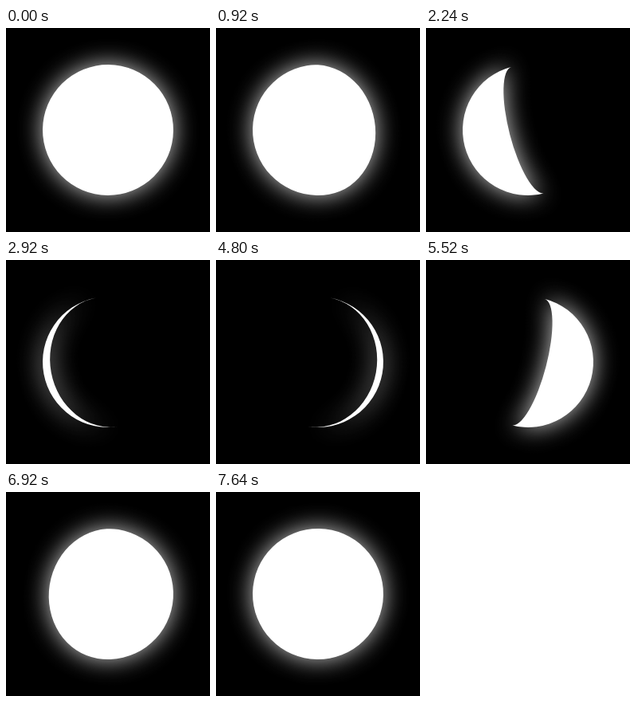
Recreate the animation shown at these times as an HTML page. Size 256x256 px, loop 7.68 s.

```html
<!DOCTYPE html>
<html lang="en">
<head>
<meta charset="utf-8">
<title>Moon phases</title>
<style>
  html, body { margin: 0; width: 100%; height: 100%; overflow: hidden; background: #000; }
  svg { display: block; width: 100vw; height: 100vh; }
</style>
</head>
<body>
<svg viewBox="0 0 256 256">
  <defs>
    <filter id="blur" filterUnits="userSpaceOnUse" x="-128" y="-128" width="256" height="256"
            color-interpolation-filters="sRGB">
      <feGaussianBlur stdDeviation="15"/>
    </filter>
    <path id="lit"/>
  </defs>
  <g id="moon" fill="#fff">
    <use href="#lit" filter="url(#blur)" opacity=".8"/>
    <use href="#lit"/>
  </g>
</svg>
<script>
const LOOP = 7680;
const FULL = 40; // time of the full moon
const R = 82;
const TILT = 15;
// [ms from full moon, phase angle in degrees]
const PHASES = [[0, 0], [880, 28.7], [1560, 63.2], [2920, 154.5], [3560, 180]];

const moon = document.getElementById('moon');
const lit = document.getElementById('lit');

// Slope through the neighbours; flat at both ends
function slope(i) {
  const a = PHASES[i - 1], b = PHASES[i + 1];
  return a && b ? (b[1] - a[1]) / (b[0] - a[0]) : 0;
}

// Cubic Hermite interpolation of the phase table
function phaseAt(t) {
  const i = PHASES.findIndex(p => p[0] > t) - 1;
  if (i < 0) return 180;
  const [t0, p0] = PHASES[i], [t1, p1] = PHASES[i + 1];
  const span = t1 - t0, u = (t - t0) / span, v = 1 - u;
  return p0 * v * v * (1 + 2 * u) + p1 * u * u * (3 - 2 * u)
    + span * u * v * (slope(i) * v - slope(i + 1) * u);
}

function draw(now) {
  const t = (now - FULL + LOOP) % LOOP;
  const waxing = t > LOOP / 2;
  const k = Math.cos(phaseAt(waxing ? LOOP - t : t) * Math.PI / 180);
  const tilt = -TILT * Math.sin(2 * Math.PI * t / LOOP);

  // Outer limb on the left, terminator as a half ellipse back to the top
  lit.setAttribute('d', k < -0.9999 ? '' :
    `M0 ${-R}A${R} ${R} 0 0 0 0 ${R}A${R * Math.abs(k)} ${R} 0 0 ${k > 0 ? 0 : 1} 0 ${-R}Z`);
  moon.setAttribute('transform',
    `translate(128 128) rotate(${tilt}) scale(${waxing ? -1 : 1} 1)`);
}

const start = performance.now();
function tick() {
  draw(performance.now() - start);
  requestAnimationFrame(tick);
}
tick();
</script>
</body>
</html>
```
